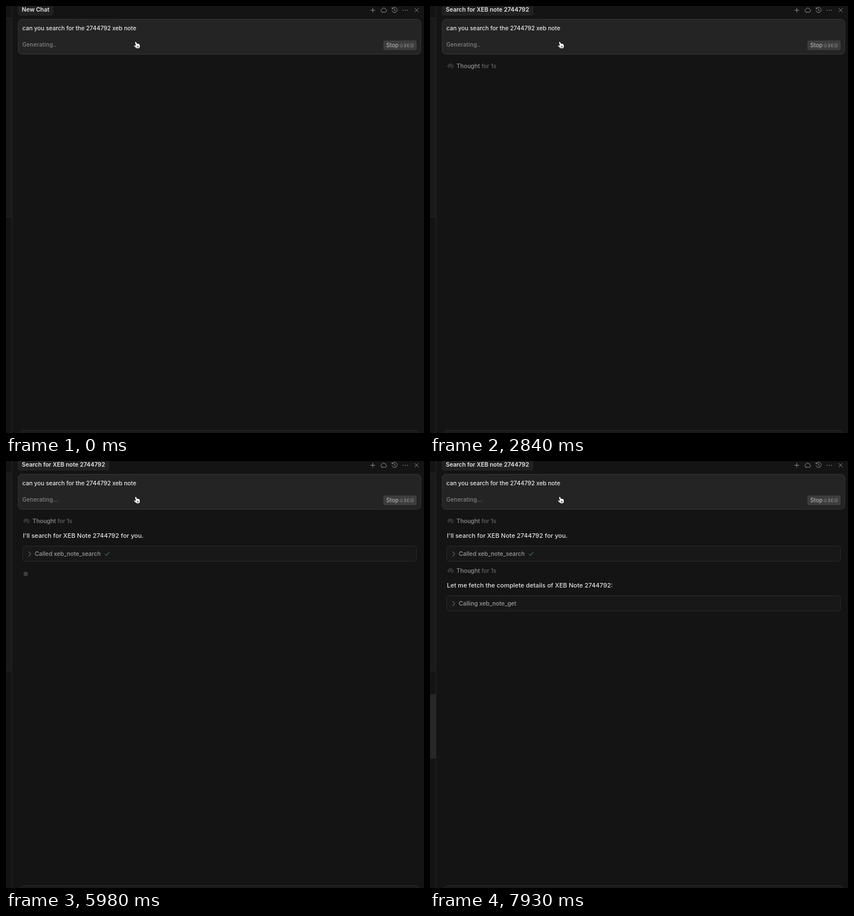
These frames come from a looping animation (741x756 px, 8000 ms). An HTML page:

```html
<!DOCTYPE html>
<html lang="en">
<head>
<meta charset="utf-8">
<title>Chat panel</title>
<style>
html, body { margin: 0; width: 100%; height: 100%; overflow: hidden; background: #141414; }
#stage { position: relative; width: 741px; height: 756px; overflow: hidden; background: #141414;
  font: 500 10.3px/16px Inter, "Open Sans", sans-serif; color: #8c8c8c; }
#stage div, #stage svg { position: absolute; box-sizing: border-box; white-space: pre; }
svg { fill: none; stroke: #8a8a8a; stroke-linecap: round; stroke-linejoin: round; overflow: visible; }

#rail { left: 0; top: 0; width: 11px; height: 756px; border-right: 1px solid #272727; }
#rail div { left: 0; width: 10px; }
#pane { top: 21px; height: 353px; background: #1a1a1a; border: solid #272727; border-width: 1px 0; }
#thumb { top: 413px; height: 114px; background: #272727; animation: thumb 8s infinite; }
#title { left: 21px; top: -4px; height: 21px; padding: 3px 7px; border-radius: 4px; background: #212121;
  color: #e4e4e4; font-weight: 600; font-size: 10.4px; }
#prompt { left: 21px; top: 23px; width: 715px; height: 63px; border: 1px solid #343434; border-radius: 7px;
  background: #242424; }
#ask { left: 7px; top: 7px; color: #e8e8e8; }
#status { left: 7px; top: 37px; font-size: 9.8px; letter-spacing: .25px; color: #868686; }
#stop { left: 647px; top: 37px; width: 59px; height: 17px; border-radius: 3px; background: #3d3d3d;
  padding-left: 5px; color: #acacac; font-size: 10px; }
#input { left: 24px; top: 751px; width: 709px; height: 30px; border: 1px solid #2a2a2a; border-radius: 7px; background: #1a1a1a; }

.step { left: 0; top: 0; width: 741px; height: 200px; }
.step > .cut { left: 0; top: 0; }
#second { top: 88px; }
.brain { left: 31px; top: 101px; }
.head { left: 47px; top: 98px; color: #646464; }
.head b { font-weight: 500; color: #909090; }
.planning { color: transparent; background: linear-gradient(90deg, #565656 42%, #999 50%, #565656 58%) 100% 0 / 300% 100%;
  -webkit-background-clip: text; background-clip: text; animation: shimmer 2s -1.77s linear infinite; }
.thought { left: 48px; top: 121px; font-size: 10.4px; color: #858585; }
.reply { left: 30px; top: 124px; font-size: 11px; color: #e0e0e0; }
.words span { animation: word 8s linear infinite backwards; }
.tool { left: 29px; top: 150px; width: 699px; height: 28px; border: 1px solid #2a2a2a; border-radius: 5px; background: #181818; }
.tool .label { left: 21px; top: 5px; color: #9a9a9a; }
.tool .chevron { left: 9px; top: 9px; }
.tool .buttons { left: 0; top: 23px; width: 697px; height: 20px; }
.cancel { left: 597px; top: 2px; color: #8c8c8c; }
.run { left: 639px; top: 1px; width: 51px; height: 18px; border-radius: 3px; padding: 1px 0; text-align: center;
  background: #33567a; color: #0f1a26; }
.check { left: 145px; top: 10px; stroke: #5f9c78; }
#pulse { left: 31px; top: 196px; width: 8px; height: 8px; border-radius: 50%; background: #8a8a8a; opacity: 0;
  animation: pulse 8s infinite; }

.cut { visibility: hidden; animation: 8s step-end infinite; }
.plan1 { animation-name: plan1; } .done1 { animation-name: done1; }
.plan2 { animation-name: plan2; } .done2 { animation-name: done2; }
.ask1 { animation-name: ask1; } .call1 { animation-name: call1; } .called1 { animation-name: called1; }
.ask2 { animation-name: ask2; } .call2 { animation-name: call2; }
.tool1 { animation: rise1 8s linear infinite, fold1 8s step-end infinite; }
.tool2 { animation: rise2 8s linear infinite, fold2 8s step-end infinite; }

@keyframes plan1 { 26% { visibility: visible } 35.5%, 100% { visibility: hidden } }
@keyframes done1 { 35.5%, 100% { visibility: visible } }
@keyframes plan2 { 80.2% { visibility: visible } 88%, 100% { visibility: hidden } }
@keyframes done2 { 88%, 100% { visibility: visible } }
@keyframes ask1 { 40% { visibility: visible } 46%, 100% { visibility: hidden } }
@keyframes call1 { 46% { visibility: visible } 52%, 100% { visibility: hidden } }
@keyframes called1 { 52%, 100% { visibility: visible } }
@keyframes ask2 { 90% { visibility: visible } 95%, 100% { visibility: hidden } }
@keyframes call2 { 95%, 100% { visibility: visible } }
@keyframes rise1 { 0%, 40% { opacity: 0; transform: translateY(8px) } 44%, 100% { opacity: 1; transform: none } }
@keyframes rise2 { 0%, 90.5% { opacity: 0; transform: translateY(8px) } 94.5%, 100% { opacity: 1; transform: none } }
@keyframes fold1 { 0% { height: 50px } 46%, 100% { height: 28px } }
@keyframes fold2 { 0% { height: 50px } 95%, 100% { height: 28px } }
@keyframes word { 0% { opacity: 0 } .9%, 85% { opacity: 1 } 85.01%, 100% { opacity: 0 } }
@keyframes shimmer { from { background-position: 100% 0 } to { background-position: 0 0 } }
@keyframes thumb { 0%, 93.5% { opacity: 0 } 98%, 100% { opacity: 1 } }
@keyframes pulse { 0%, 57% { opacity: 0 } 61% { opacity: .45 } 65% { opacity: .1 } 69% { opacity: .45 }
  73% { opacity: .1 } 77% { opacity: .45 } 80%, 100% { opacity: 0 } }
</style>
</head>
<body>
<svg width="0" height="0" style="position:absolute">
  <symbol id="brain" viewBox="0 0 11 11" overflow="visible">
    <path d="M2.300 8C.4 7 .2 4.500 1.800 3.100 3.500 1.500 7 1.300 8.600 2.800 9.900 4 9.600 5.200 10.400 6.300L9.300 6.800V8.200H7.300V9M3.200 6.900C1.900 5.300 3.600 3.700 5.300 3.800 7.300 3.900 7.700 5.900 6 6.300 4.700 6.500 4.300 5.300 5.300 5.100" stroke="#6a6a6a" stroke-width=".85"/>
  </symbol>
</svg>
<div id="stage">
  <div id="rail"><div id="pane"></div><div id="thumb"></div></div>
  <div id="title">New Chat</div>
  <svg width="741" height="16" style="left:0;top:0" stroke-width="1">
    <path d="M646.500 7.500h7.500M650.200 3.700v7.500M724.700 4.200l6.400 6.400M731.100 4.200l-6.400 6.400"/>
    <path d="M667 11h5.600a2.300 2.300 0 0 0 .4-4.500 3.400 3.400 0 0 0-6.500-.8A2.700 2.700 0 0 0 667 11z"/>
    <path d="M684.700 4.500a4.700 4.700 0 1 1-.5 3.600M684.300 2.600v2.300h2.300M688.700 4.600v2.900l1.900 1.200"/>
    <path d="M704.200 7.500h.01M707.900 7.500h.01M711.600 7.500h.01" stroke-width="1.700"/>
  </svg>
  <div id="prompt">
    <div id="ask">can you search for the 2744792 xeb note</div>
    <div id="status">Generating..</div>
    <div id="stop">Stop
      <svg width="26" height="8" style="left:28px;top:5px;stroke:#858585;stroke-width:.8">
        <path d="M4 .8 7 4H5.400v2.600H2.600V4H1z"/>
        <path d="M11 2.500h4v2.600h-4zM11 2.500H10a1 1 0 1 1 1-1zM15 2.500V1.500a1 1 0 1 1 1 1zM15 5.100h1a1 1 0 1 1-1 1zM11 5.100v1a1 1 0 1 1-1-1z"/>
        <path d="M18.500 3.800 20.500 1.200H25v5.200H20.500zM21.700 2.800l2 2M23.700 2.800l-2 2"/>
      </svg>
    </div>
  </div>

  <div class="step" id="first">
    <div class="cut plan1">
      <svg class="brain" width="11" height="11"><use href="#brain"/></svg>
      <div class="head planning">Planning next moves</div>
      <div class="thought words" data-start="2070" data-gap="10">The user is asking me to search for a specific XEB note with ID 2744792. I have access to XEB note search functionality through the
mcp_xeb-notes_xeb_note_search tool</div>
    </div>
    <div class="cut done1">
      <svg class="brain" width="11" height="11"><use href="#brain"/></svg>
      <div class="head"><b>Thought</b> for 1s</div>
      <div class="reply words" data-start="2850" data-gap="22">I'll search for XEB Note 2744792 for you.</div>
    </div>
    <div class="tool tool1">
      <svg class="chevron" width="6" height="9"><path d="M1 .5 5 4.500 1 8.500"/></svg>
      <div class="label cut ask1">Calling undefined</div>
      <div class="label cut call1">Calling xeb_note_search</div>
      <div class="label cut called1">Called xeb_note_search</div>
      <svg class="check cut called1" width="9" height="7"><path d="M.8 3.800 3 6.200 8 .6"/></svg>
      <div class="buttons cut ask1"><div class="cancel">Cancel</div><div class="run">Run tool</div></div>
    </div>
    <div id="pulse"></div>
  </div>

  <div class="step" id="second">
    <div class="cut plan2">
      <svg class="brain" width="11" height="11"><use href="#brain"/></svg>
      <div class="head planning">Planning next moves</div>
      <div class="thought words" data-start="6400" data-gap="8">The search found the note but only returns basic metadata. To get the full content of the XEB note, I should use the mcp_xeb-
notes_xeb_note_get tool with the ID to fetch the complete details</div>
    </div>
    <div class="cut done2">
      <svg class="brain" width="11" height="11"><use href="#brain"/></svg>
      <div class="head"><b>Thought</b> for 1s</div>
      <div class="reply words" data-start="7050" data-gap="16">Let me fetch the complete details of XEB Note 2744792:</div>
    </div>
    <div class="tool tool2">
      <svg class="chevron" width="6" height="9"><path d="M1 .5 5 4.500 1 8.500"/></svg>
      <div class="label cut ask2">Calling undefined</div>
      <div class="label cut call2">Calling xeb_note_get</div>
      <div class="buttons cut ask2"><div class="cancel">Cancel</div><div class="run">Run tool</div></div>
    </div>
  </div>

  <div id="input"></div>
  <svg width="12" height="14" style="left:226px;top:62px;stroke:#111;stroke-width:.8">
    <path fill="#fff" d="M3.200 1.200c.9-.6 1.700 0 2 .8l1 2.600c.5-.6 1.400-.5 1.700.2.600-.5 1.400-.2 1.600.4.800-.2 1.400.2 1.600.9l.6 2.700c.2 1-.2 1.700-.5 2.400l-.1 1.500-5.300.9-.6-1.200C3.800 11.800 2 10.600.9 8.900.3 7.900 1.500 7 2.500 7.700l1.100.7L2.600 2.500c-.1-.6.100-1 .6-1.300z"/>
    <path d="M6.600 9l.4 2.300M8.300 8.700l.4 2.300"/>
  </svg>
</div>
<script>
const LOOP = 8000, DOT = 175;
const titleBox = document.getElementById('title');
const statusBox = document.getElementById('status');
const chatName = 'Search for XEB note 2744792';

for (const box of document.querySelectorAll('.words')) {
  const { start, gap } = box.dataset;
  const parts = box.textContent.match(/[^\s_-]+[\s_-]*/g);
  box.replaceChildren(...parts.map((part, i) => {
    const span = document.createElement('span');
    span.textContent = part;
    span.style.animationDelay = +start + i * gap + 'ms';
    return span;
  }));
}

const setText = (el, text) => { if (el.textContent !== text) el.textContent = text; };

let origin;
function draw(now) {
  origin ??= now;
  const t = (now - origin) % LOOP;
  const dots = Math.floor(Math.max(2, t / DOT + 1.81)) % 4;
  setText(statusBox, 'Generating' + '.'.repeat(dots));
  setText(titleBox, t < 1000 ? 'New Chat' : chatName.slice(0, 1 + Math.floor((t - 1000) / 20)));
  requestAnimationFrame(draw);
}
requestAnimationFrame(draw);
</script>
</body>
</html>
```
